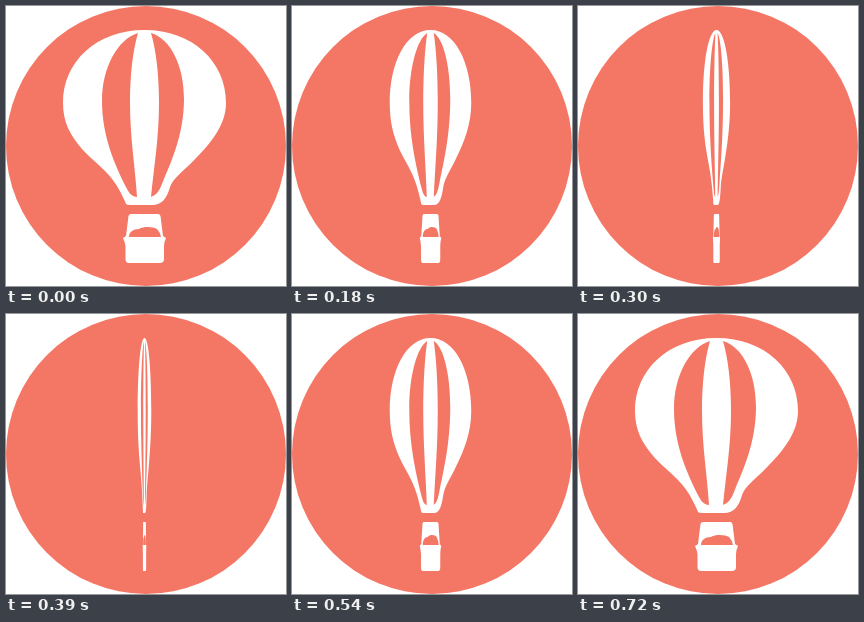
Recreate the animation shown at these times as an HTML page. Size 280 by 280 pixels, loop 0.79 s.

```html
<!DOCTYPE html>
<html lang="en">
<head>
<meta charset="utf-8">
<title>Turning balloon</title>
<style>
  html, body { margin: 0; height: 100%; overflow: hidden; background: #fff; }
  svg { display: block; width: 100%; height: 100%; }
  .coral { fill: #f47766; }
  .white { fill: #fff; }
</style>
</head>
<body>
<svg viewBox="0 0 280 280">
  <circle class="coral" cx="140" cy="140" r="140"/>
  <g id="balloon">
    <path class="white" d="M138.5 24C90 24 57 56 57 97C57 116 64 129 76 143C87 155 103 166 111 180C115 187 118 193 120 198Q121 199 124 199H146C156 199 161 192 164 181C167 172 179 164 191 151C206 136 220 118 220 97C220 56 187 24 138.5 24Z"/>
    <path class="coral" d="M132 27C112 33 96 61 96 95C96 132 110 161 121 183Q125 191 131 191C129 160 124 132 124 97C124 68 127 44 132 27Z"/>
    <path class="coral" d="M145 27C165 33 178 60 178 93C178 130 164 158 156 178Q152 189 145 191C148 160 153 132 153 97C153 68 150 44 145 27Z"/>
    <path class="white" d="M125 208H152Q154 208 154.500 210L157 230L160 232Q158 236 158 240V253Q158 257 154 257H123Q119.500 257 119.500 253V240Q119 236 117 232L120 230L122.500 210Q123 208 125 208Z"/>
    <path class="coral" d="M123 231C123 226 127 223 133 223C138 220 148 221 151 223Q154 226 155 231Z"/>
  </g>
</svg>
<script>
  const LOOP = 790, STEP = 30, HALF = 12, AXIS = 138.5;
  const balloon = document.getElementById('balloon');

  // Linear squash to edge-on and back, in steps, with a short rest at full width.
  function draw(now) {
    const step = Math.min(Math.floor(now % LOOP / STEP), 2 * HALF);
    const width = Math.max(Math.abs(1 - step / HALF), 0.006);
    balloon.setAttribute('transform', `translate(${AXIS}) scale(${width} 1) translate(${-AXIS})`);
    requestAnimationFrame(() => draw(performance.now()));
  }
  draw(0);
</script>
</body>
</html>
```
